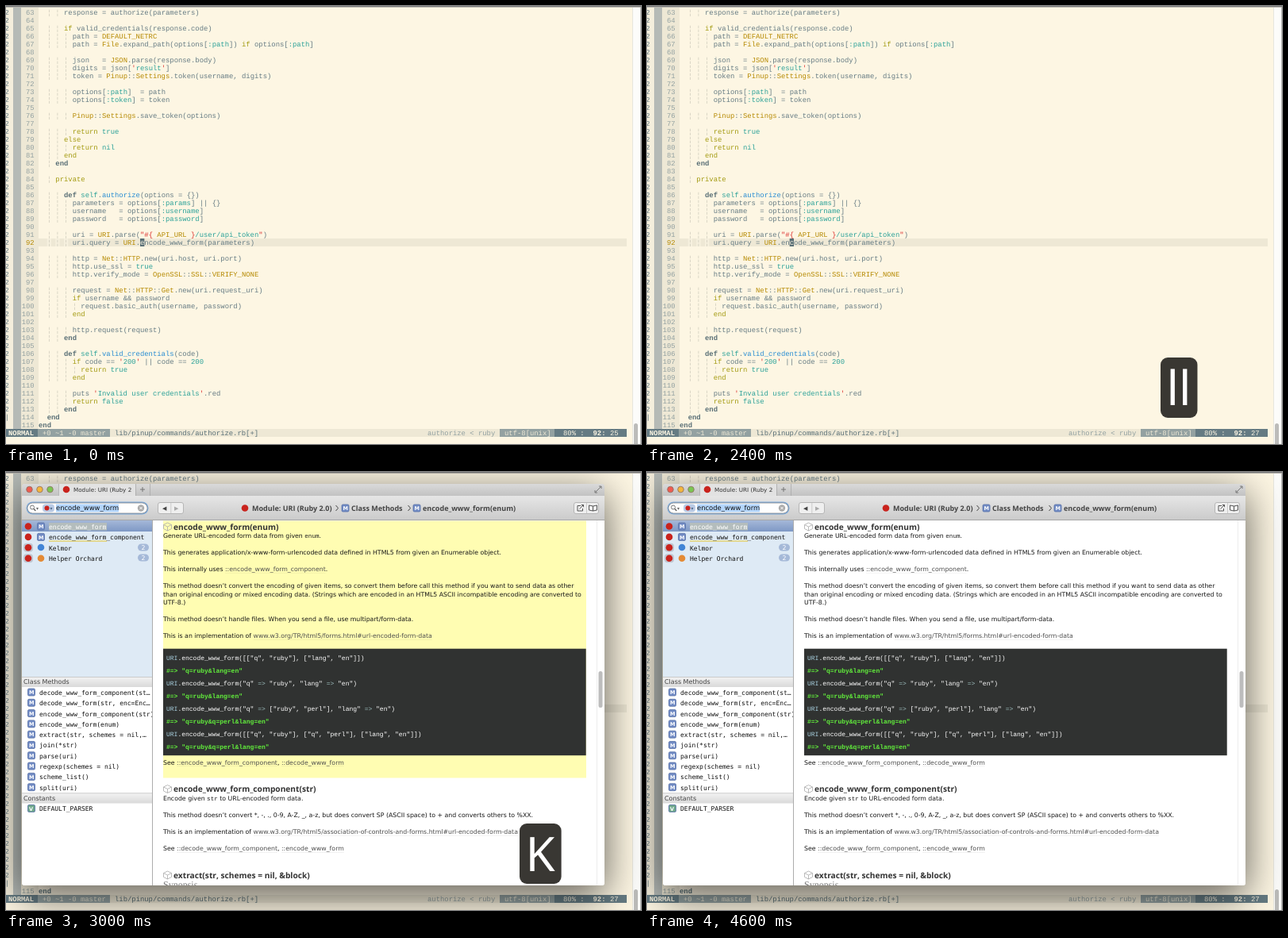
Recreate the animation shown at these times as an HTML page with a canvas. Size 800 by 552 pixels, loop 4800 ms.

```html
<!DOCTYPE html>
<html lang="en">
<head>
<meta charset="utf-8">
<title>Editor documentation lookup</title>
<style>
html, body { margin: 0; width: 800px; height: 552px; overflow: hidden; background: #fdf6e3; }
canvas { display: block; }
</style>
</head>
<body>
<canvas id="stage" width="800" height="552"></canvas>
<script>
const ctx = document.getElementById('stage').getContext('2d');
ctx.textRendering = 'geometricPrecision';

const LOOP = 4800, STEP = 200;
const MONO = '8.89px "Liberation Mono", monospace';
const MENLO = '8px "DejaVu Sans Mono", monospace';
const CODE = '8px "Liberation Mono", monospace';
const BODY = '7.8px "DejaVu Sans", sans-serif';
const HEAD = '700 10.2px "Open Sans", sans-serif';
const CRUMB = '700 9px "Open Sans", sans-serif';
const KEYS = '60px "Noto Sans", sans-serif';
const C = { paper: '#fdf6e3', band: '#eee8d5', text: '#657b83', dim: '#93a1a1', dark: '#586e75',
  word: '#a39a10', name: '#b58900', cyan: '#2aa198', blue: '#268bd2', red: '#dc322f' };

const FIRST = 63, CHAR = 16 / 3, LEFT = 41;
const source = `      response = authorize(parameters)

      if valid_credentials(response.code)
        path = DEFAULT_NETRC
        path = File.expand_path(options[:path]) if options[:path]

        json   = JSON.parse(response.body)
        digits = json['result']
        token = Pinup::Settings.token(username, digits)

        options[:path]  = path
        options[:token] = token

        Pinup::Settings.save_token(options)

        return true
      else
        return nil
      end
    *end

    private

      *def self.authorize(options = {})
        parameters = options[:params] || {}
        username   = options[:username]
        password   = options[:password]

        uri = URI.parse("#{ API_URL }/user/api_token")
        uri.query = URI.encode_www_form(parameters)

        http = Net::HTTP.new(uri.host, uri.port)
        http.use_ssl = true
        http.verify_mode = OpenSSL::SSL::VERIFY_NONE

        request = Net::HTTP::Get.new(uri.request_uri)
        if username && password
          request.basic_auth(username, password)
        end

        http.request(request)
      *end

      *def self.valid_credentials(code)
        if code == '200' || code == 200
          return true
        end

        puts 'Invalid user credentials'.red
        return false
      *end
  *end
*end`.split('\n');

function rect(x, y, w, h, color) { ctx.fillStyle = color; ctx.fillRect(x, y, w, h); }

function round(x, y, w, h, r, fill, stroke) {
  ctx.beginPath();
  ctx.roundRect(x, y, w, h, r);
  if (fill) { ctx.fillStyle = fill; ctx.fill(); }
  if (stroke) { ctx.strokeStyle = stroke; ctx.lineWidth = 0.8; ctx.stroke(); }
}

function dot(x, y, r, fill, stroke) { round(x - r, y - r, 2 * r, 2 * r, r, fill, stroke); }

function text(str, x, y, font, color) {
  ctx.font = font;
  ctx.fillStyle = color;
  ctx.fillText(str, x, y + 2.9);
  return x + ctx.measureText(str).width;
}

function path(color, width, ...lines) {
  ctx.strokeStyle = color;
  ctx.lineWidth = width;
  ctx.beginPath();
  for (const line of lines) line.forEach(([x, y], i) => i ? ctx.lineTo(x, y) : ctx.moveTo(x, y));
  ctx.stroke();
}

function shade(y0, y1, top, bottom) {
  const g = ctx.createLinearGradient(0, y0, 0, y1);
  g.addColorStop(0, top);
  g.addColorStop(1, bottom);
  return g;
}

// Editor

function codeLine(line, y) {
  const indent = line.search(/\S/);
  for (let c = 2; c < indent; c += 2) text('¦', LEFT + c * CHAR, y, MONO, '#cdcabb');
  let col = 0, quoted = false, before = '', last = '';
  for (const [raw] of line.matchAll(/["']|#\{|\}|\*?\w+|:[a-z]\w*|\s+|./g)) {
    const bold = raw[0] === '*';
    const token = bold ? raw.slice(1) : raw;
    let color = C.text;
    if (/["']/.test(token)) { quoted = !quoted; color = C.red; }
    else if (quoted) color = /^(#\{|\})$/.test(token) ? C.red : token === 'API_URL' ? C.name : C.cyan;
    else if (bold) color = C.dark;
    else if (/^(if|else|end|return|private)$/.test(token)) color = C.word;
    else if (/^(self|true|false|nil|\d+|:[a-z]\w*)$/.test(token)) color = C.cyan;
    else if (/^[A-Z]/.test(token)) color = C.name;
    else if (before === 'self' && last === '.') color = C.blue;
    if (token.trim()) text(token, LEFT + col * CHAR, y, bold ? 'bold ' + MONO : MONO, color);
    col += token.length;
    before = last;
    last = token;
  }
}

function editor(column) {
  rect(0, 0, 800, 552, C.paper);
  rect(0, 2, 9, 531, '#f4eedc');
  rect(9, 2, 10, 531, '#b5bab6');
  rect(19, 2, 22, 531, C.band);
  rect(41, 293, 741, 10, C.band);
  for (const c of [2, 4, 6]) rect(LEFT + c * CHAR, 293, CHAR, 10, '#f6f0de');
  source.forEach((line, i) => {
    const n = FIRST + i, y = 8 + i * 10, label = String(n);
    text(label, LEFT - (label.length + 1) * CHAR, y, MONO, n === 92 ? C.name : C.dim);
    if (i < 51) text('2', -1.5, y, MONO, C.text);
    if (i === 51) text('|', -1, y, MONO, C.text);
    codeLine(line, y);
  });
  const x = LEFT + (column - 1) * CHAR;
  rect(x, 293, CHAR, 10, C.dark);
  text(source[92 - FIRST][column - 1], x, 298, MONO, C.paper);

  rect(0, 533, 782, 10, C.band);
  rect(0, 533, 40, 10, C.text);
  rect(40, 533, 91, 10, C.dim);
  rect(622, 533, 69, 10, C.dim);
  rect(691, 533, 91, 10, C.text);
  const bar = (s, x, color, bold) => text(s, x, 538, (bold ? 'bold ' : '') + MONO, color);
  bar('NORMAL', 3, C.paper, true);
  bar('+0 ~1 -0 master', 46, C.band);
  bar('lib/pinup/commands/authorize.rb[+]', 137, C.dark);
  bar('authorize < ruby', 531, C.dim);
  bar('utf-8[unix]', 628, C.band);
  bar('80% :', 702, C.paper);
  bar('92:', 739.5, C.paper, true);
  bar(String(column), 761, C.paper);

  rect(0, 0, 800, 1.5, '#77787a');
  rect(789, 2, 11, 550, '#fcfcfa');
  rect(789, 2, 0.8, 550, '#e2e0d8');
  round(791, 526, 5, 30, 2.5, '#bcbcba');
  rect(799, 2, 1, 550, '#b9b9b7');
}

// Documentation window

function badge(x, y, letter = 'M', color = '#718bc4') {
  round(x - 4.5, y - 4.5, 9, 9, 1.5, color, '#5871a8');
  text(letter, x - 2.9, y - 0.3, 'bold 6.5px "DejaVu Sans", sans-serif', '#fff');
}

function gem(x, y) { dot(x, y, 4.3, '#c9231d'); }

function cube(x, y) {
  const hex = [[x, y - 5], [x + 5, y - 2.5], [x + 5, y + 2.5], [x, y + 5], [x - 5, y + 2.5], [x - 5, y - 2.5], [x, y - 5]];
  path('#aaa', 0.8, hex, [[x - 5, y - 2.5], [x, y], [x + 5, y - 2.5]], [[x, y], [x, y + 5]]);
}

function sectionBar(label, y) {
  rect(20, y, 164, 13, shade(y, y + 13, '#f3f3f3', '#d9d9d9'));
  rect(20, y, 164, 0.7, '#bbb');
  text(label, 22, y + 6.5, '8px "DejaVu Sans", sans-serif', '#444');
}

function breadcrumb(ink, alpha) {
  const crumb = (s, x) => text(s, x, 45.7, CRUMB, ink);
  ctx.save();
  ctx.globalAlpha = alpha;
  gem(301, 45.5);
  badge(427.5, 45.5);
  badge(517.5, 45.5);
  ctx.restore();
  crumb('Module: URI (Ruby 2.0)', 310);
  crumb('Class Methods', 435);
  crumb('encode_www_form(enum)', 525);
  for (const x of [415.5, 506.5]) path(ink, 1, [[x, 42], [x + 3, 45.5], [x, 49]]);
}

function chrome(focused) {
  const ink = focused ? '#444' : '#858585';
  const button = focused ? '#efefef' : '#fafafa';
  rect(20, 15, 734, 15, focused ? shade(15, 30, '#dadada', '#c2c2c2') : shade(15, 30, '#f4f4f4', '#e6e6e6'));
  rect(20, 30, 734, 31, focused ? shade(30, 61, '#e6e6e6', '#cacaca') : shade(30, 61, '#f8f8f8', '#ebebeb'));
  rect(66, 15, 97, 15, focused ? '#e2e2e2' : '#f6f6f6');
  for (const x of [66, 163, 181]) rect(x, 15, 0.7, 15, focused ? '#a5a5a5' : '#c4c4c4');
  rect(20, 60.3, 734, 0.7, focused ? '#999' : '#b5b5b5');
  ['#ee5b50', '#f3b63d', '#7bc652'].forEach((c, i) =>
    dot(29.5 + i * 13, 22, 3.8, focused ? c : '#f0f0f0', focused ? '#8d6c60' : '#bbb'));
  gem(76, 22);
  text('Module: URI (Ruby 2', 85, 22, '7.2px "DejaVu Sans", sans-serif', '#333');
  path('#777', 1, [[169, 22], [175, 22]], [[172, 19], [172, 25]]);
  path('#777', 1, [[747, 18], [750, 18], [750, 21]], [[742, 23], [742, 26], [745, 26]], [[750, 18], [742, 26]]);

  if (focused) round(25.5, 37.5, 154, 16, 8, '#7daada');
  round(27, 39, 151, 13, 6.5, '#fff', '#888');
  dot(33, 44.5, 2.5, null, '#555');
  path('#555', 1.2, [[35, 46.5], [37.3, 49]]);
  text('▾', 38, 45, '6px "DejaVu Sans", sans-serif', '#666');
  round(46, 40.5, 15, 10, 4, '#b9cae4');
  dot(51.5, 45.5, 3, '#c9231d');
  text('▾', 55.5, 45.5, '6px "DejaVu Sans", sans-serif', '#536b8b');
  rect(63, 40.5, 79, 10, focused ? '#b3d5fb' : '#d5d5d5');
  text('encode_www_form', 63, 45.2, '8.4px "DejaVu Sans", sans-serif', '#111');
  dot(170, 45.5, 4.2, '#aaa');
  path('#fff', 1, [[168.3, 43.8], [171.7, 47.2]], [[171.7, 43.8], [168.3, 47.2]]);

  round(191.5, 38.5, 32, 14, 2.5, button, '#aaa');
  rect(207.5, 38.5, 0.7, 14, '#bbb');
  text('◀', 197, 45, '7px "DejaVu Sans", sans-serif', ink);
  text('▶', 212, 45, '7px "DejaVu Sans", sans-serif', '#aaa');
  breadcrumb(ink, focused ? 1 : 0.5);
  round(715.5, 38.5, 31, 14, 2.5, button, '#aaa');
  rect(731, 38.5, 0.7, 14, '#bbb');
  path(ink, 0.9, [[724, 42.5], [720, 42.5], [720, 49], [726.5, 49], [726.5, 46]],
    [[722.5, 46.5], [727.5, 41.5]], [[724.8, 41.5], [727.5, 41.5], [727.5, 44.2]]);
  path(ink, 0.9, [[739.5, 43], [734.5, 42], [734.5, 48], [739.5, 49], [744.5, 48], [744.5, 42], [739.5, 43], [739.5, 49]]);
}

function sidebar(focused) {
  rect(20, 61, 164, 460, '#fff');
  rect(20, 61, 164, 197, focused ? '#deeaf5' : '#f2f4f6');
  rect(20, 61, 164, 14, shade(61, 75, '#a5b8d8', '#7e98c5'));
  rect(54, 64, 73, 9.5, '#b4bdbd');
  rect(54, 86.5, 73, 1.2, '#e7cf55');
  ['encode_www_form', 'encode_www_form_component', 'Kelmor', 'Helper Orchard'].forEach((label, i) => {
    const y = 68.5 + i * 13.4;
    if (i > 1) round(22, y - 5.5, 12, 11, 4, '#bfc7d2');
    gem(28, y);
    if (i < 2) badge(44, y);
    text(label, 54, y + 0.6, MENLO, i ? '#111' : '#fff');
  });
  dot(44, 95, 4.3, '#4285d6');
  dot(44, 108.7, 4.3, '#e48a35');
  for (const y of [95, 108]) {
    round(166, y - 4.5, 14, 9, 4.5, '#a5b9d8');
    text('2', 170.5, y, BODY, '#fff');
  }
  sectionBar('Class Methods', 258);
  ['decode_www_form_component(st…', 'decode_www_form(str, enc=Enc…', 'encode_www_form_component(str)',
    'encode_www_form(enum)', 'extract(str, schemes = nil,…', 'join(*str)', 'parse(uri)',
    'regexp(schemes = nil)', 'scheme_list()', 'split(uri)'].forEach((label, i) => {
    const y = 278 + i * 13.3;
    badge(32, y - 0.5);
    text(label, 42, y, MENLO, '#111');
  });
  sectionBar('Constants', 404.5);
  badge(32, 424, 'V', '#6fa88b');
  text('DEFAULT_PARSER', 42, 424.3, MENLO, '#111');
}

// Segments marked ` are code, those marked ~ are links.
function prose(y, ...parts) {
  let x = 198;
  for (const part of parts) {
    if (part[0] === '`') x = text(part.slice(1), x, y, '7.6px "Liberation Mono", monospace', '#222');
    else if (part[0] === '~') {
      const end = text(part.slice(1), x, y, BODY, '#4d4d4d');
      rect(x, y + 4.6, end - x, 0.4, 'rgba(0,0,0,0.13)');
      x = end;
    } else x = text(part, x, y, BODY, '#161616');
  }
}

function heading(label, y) {
  cube(203.5, y);
  text(label, 211, y + 0.6, HEAD, '#333');
}

function example(y, call, result) {
  let x = text('URI', 202, y, CODE, '#a8d0df');
  for (const part of ('.encode_www_form(' + call + ')').split(/(=>)/))
    x = text(part, x, y, CODE, part === '=>' ? '#9cbcbc' : '#fff');
  text('#=> "' + result + '"', 202, y + 16, 'bold ' + CODE, '#62ef3c');
}

function page(glow) {
  rect(184, 61, 570, 460, '#fff');
  rect(184, 61, 0.8, 460, '#999');
  if (glow) rect(198, 61.5, 533, 324, `rgba(255, 253, 153, ${glow})`);
  rect(744, 61, 0.7, 460, '#e6e6e6');
  round(746.5, 251, 5, 46, 2.5, '#bdbdbd');

  heading('encode_www_form(enum)', 69);
  prose(80, 'Generate URL-encoded form data from given ', '`enum', '.');
  prose(101, 'This generates application/x-www-form-urlencoded data defined in HTML5 from given an Enumerable object.');
  prose(122.3, 'This internally uses ', '~::encode_www_form_component', '.');
  prose(143.5, 'This method doesn’t convert the encoding of given items, so convert them before call this method if you want to send data as other');
  prose(153.8, 'than original encoding or mixed encoding data. (Strings which are encoded in an HTML5 ASCII incompatible encoding are converted to');
  prose(164, 'UTF-8.)');
  prose(185, 'This method doesn’t handle files. When you send a file, use multipart/form-data.');
  prose(206.3, 'This is an implementation of ', '~www.w3.org/TR/html5/forms.html#url-encoded-form-data');

  rect(198, 222.7, 532.7, 134.5, '#303231');
  example(234.5, '[["q", "ruby"], ["lang", "en"]]', 'q=ruby&lang=en');
  example(266.5, '"q" => "ruby", "lang" => "en"', 'q=ruby&lang=en');
  example(298.5, '"q" => ["ruby", "perl"], "lang" => "en"', 'q=ruby&q=perl&lang=en');
  example(330.5, '[["q", "ruby"], ["q", "perl"], ["lang", "en"]]', 'q=ruby&q=perl&lang=en');
  prose(366, 'See ', '~::encode_www_form_component', ', ', '~::decode_www_form');

  heading('encode_www_form_component(str)', 399.5);
  prose(411, 'Encode given ', '`str', ' to URL-encoded form data.');
  prose(432, 'This method doesn’t convert *, -, ., 0-9, A-Z, _, a-z, but does convert SP (ASCII space) to + and converts others to %XX.');
  prose(453.3, 'This is an implementation of ', '~www.w3.org/TR/html5/association-of-controls-and-forms.html#url-encoded-form-data');
  prose(474.5, 'See ', '~::decode_www_form_component', ', ', '~::encode_www_form');
  heading('extract(str, schemes = nil, &block)', 508);
  text('Synopsis', 198, 521.5, '12px "Liberation Serif", serif', '#777');
}

function docWindow(focused, glow) {
  ctx.save();
  ctx.shadowColor = focused ? 'rgba(0,0,0,0.64)' : 'rgba(0,0,0,0.42)';
  ctx.shadowBlur = focused ? 50 : 22;
  ctx.shadowOffsetY = focused ? 13 : 6;
  round(20, 15, 734, 506, [4, 4, 3, 3], '#ddd');
  ctx.restore();
  ctx.save();
  ctx.beginPath();
  ctx.roundRect(20, 15, 734, 506, [4, 4, 3, 3]);
  ctx.clip();
  page(glow);
  ctx.save();
  ctx.beginPath();
  ctx.rect(20, 61, 164, 460);
  ctx.clip();
  sidebar(focused);
  ctx.restore();
  chrome(focused);
  ctx.restore();
}

function keycap(label, top, alpha) {
  ctx.save();
  ctx.globalAlpha = alpha;
  ctx.font = KEYS;
  round(647, top, ctx.measureText(label).width + 15.5, 76, 9, 'rgba(49,47,43,0.96)');
  ctx.fillStyle = '#fff';
  ctx.fillText(label, 654.5, top + 60);
  ctx.restore();
}

function draw(t) {
  editor(t < 1000 ? 25 : t < 1400 ? 26 : 27);
  if (t >= 2600) {
    const glow = Math.cos((t - 2800) / 600 * Math.PI) / 2 + 0.5;
    docWindow(t >= 2800, t >= 2800 && t < 3400 ? glow : 0);
    if (t < 2800) keycap('ll', 360, 0.5);
    if (t < 4200) keycap('K', 443, t < 4000 ? 1 : 0.5);
  } else if (t >= 1000) {
    keycap(t < 1200 ? 'l' : 'll', 443, 1);
  }
}

const start = performance.now();
let shown = -1;
function frame() {
  const t = Math.floor((performance.now() - start) % LOOP / STEP) * STEP;
  if (t !== shown) draw(shown = t);
  requestAnimationFrame(frame);
}
frame();
</script>
</body>
</html>
```
